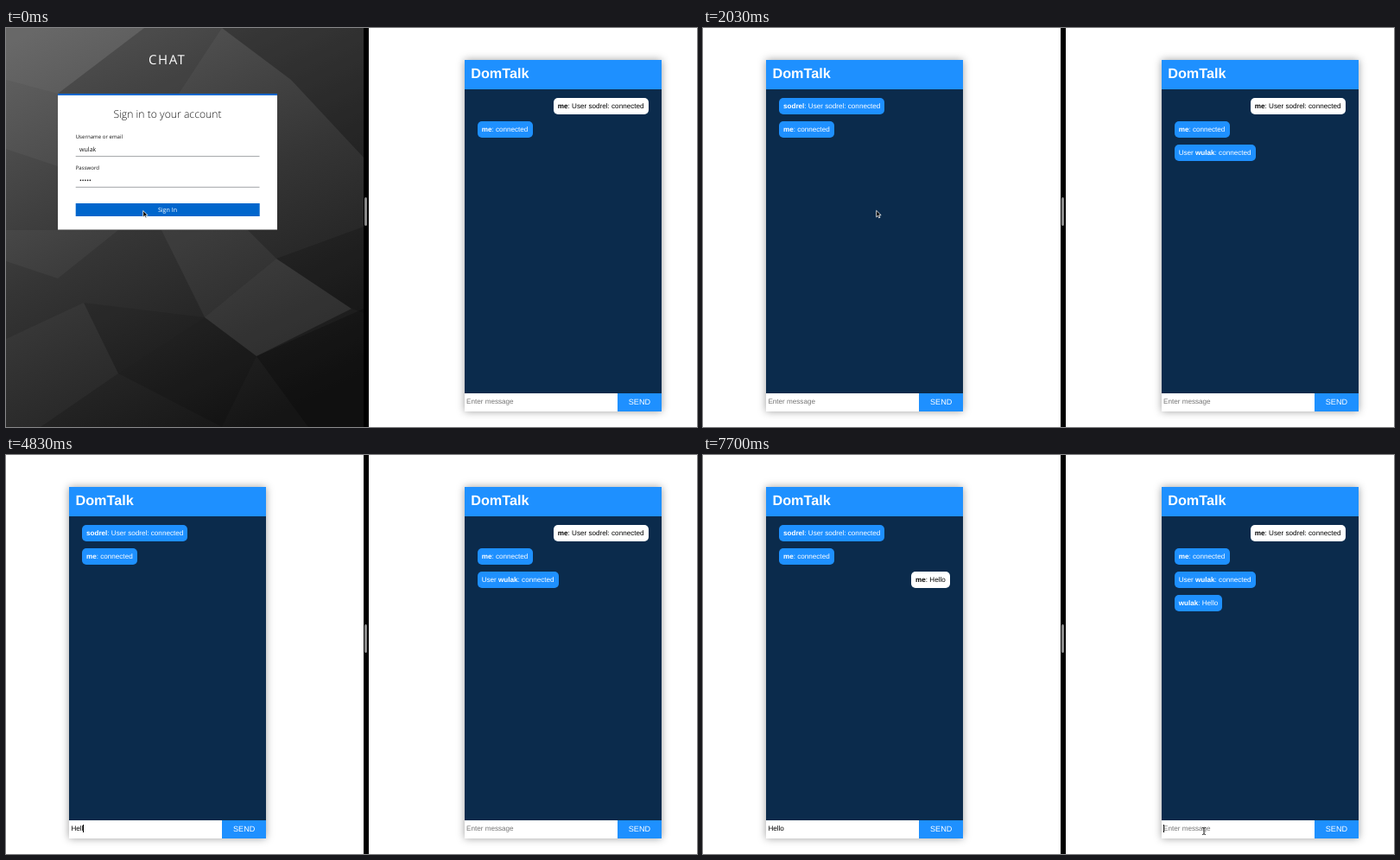
An HTML page that plays this animation: 800 by 462 pixels, repeating every 8 s.

```html
<!DOCTYPE html>
<html lang="en">
<head>
<meta charset="utf-8">
<title>Chat</title>
<style>
  html, body { margin: 0; width: 800px; height: 462px; overflow: hidden; background: #fff; }
  body { position: relative; font: 8.12px "Liberation Sans", Arial, sans-serif; text-rendering: geometricPrecision; }
  svg { position: absolute; left: 0; top: 0; overflow: visible; }
  #login { font-family: "Open Sans", sans-serif; }
  .divider { position: absolute; left: 413.5px; top: 0; width: 6px; height: 462px; background: #000; }
  .divider::after { content: ""; position: absolute; left: 1.7px; top: 196px; width: 2.6px; height: 33px; border-radius: 2px; background: #8a8a8a; }
  .panel { position: absolute; top: 37.4px; width: 228.2px; height: 406.4px; background: #0b2b4c; box-shadow: 0 0 9px rgba(0, 0, 0, .38); }
  .panel header { height: 33.5px; padding-left: 7.7px; background: #1e90ff; color: #fff; font: bold 16.24px/33.5px "Liberation Sans", Arial, sans-serif; }
  .bubble { position: absolute; left: 15px; height: 19.5px; padding: 0 5.2px; border-radius: 5px; background: #1e90ff; color: #fff; line-height: 19.5px; white-space: pre; }
  .bubble.own { left: auto; right: 15px; background: #fff; color: #000; }
  .entry { position: absolute; left: 0; bottom: 0; width: 175px; height: 20.3px; padding-left: 2.6px; background: #fff; color: #000; line-height: 20.3px; white-space: pre; }
  .caret { display: inline-block; width: .8px; height: 9px; margin-right: -.8px; vertical-align: -1.8px; background: #000; }
  .hint { color: #757575; }
  .send { position: absolute; right: 0; bottom: 0; width: 50.6px; height: 20.3px; background: #1e90ff; color: #fff; font-size: 9.1px; line-height: 20.8px; text-align: center; }
</style>
</head>
<body>
<div id="panels"></div>

<svg id="login" width="414" height="462" viewBox="0 0 414 462">
  <defs>
    <linearGradient id="shade" gradientUnits="userSpaceOnUse" x1="40" y1="0" x2="270" y2="470">
      <stop offset="0" stop-color="#5c5c5c"/>
      <stop offset=".5" stop-color="#353535"/>
      <stop offset="1" stop-color="#151515"/>
    </linearGradient>
  </defs>
  <path fill="url(#shade)" d="M0 0H414V462H0z"/>
  <g fill="#fff">
    <path opacity=".07" d="M0 0H160L60 76 0 60z"/>
    <path opacity=".04" d="M0 60L60 76V160L0 140zM0 234H130L60 290 0 270z"/>
    <path opacity=".05" d="M313 267L230 335 180 234H280z"/>
    <path opacity=".08" d="M313 267L400 325 290 380 230 335z"/>
    <path opacity=".03" d="M0 360L90 318 130 400 40 462H0z"/>
  </g>
  <g>
    <path opacity=".1" d="M160 0H250L200 76H60zM90 318L230 335 130 400z"/>
    <path opacity=".28" d="M250 0H414V150L330 60z"/>
    <path opacity=".18" d="M313 267L414 230V330L400 325z"/>
    <path opacity=".15" d="M130 400L230 335 290 380 250 462z"/>
    <path opacity=".25" d="M290 380L414 325V462H350z"/>
  </g>
  <text x="165" y="42" font-size="15" letter-spacing="1.55" fill="#fff">CHAT</text>
  <path fill="#fff" d="M60 76H314V233.5H60z"/>
  <path fill="#06c" d="M60 76H314V78H60z"/>
  <g fill="#151515">
    <text x="187" y="104" font-size="12.2" font-weight="300" text-anchor="middle">Sign in to your account</text>
    <text x="80.7" y="128" font-size="6.1">Username or email</text>
    <text x="85" y="142.6" font-size="7.1">wulak</text>
    <text x="80.7" y="163.8" font-size="6.1">Password</text>
    <text x="85" y="178.6" font-size="7.3">•••••</text>
  </g>
  <path stroke="#8a8d90" stroke-width=".8" d="M80.7 148.6H293.5M80.7 184.3H293.5"/>
  <path id="button" d="M80.7 203H293.7V218H80.7z"/>
  <text id="buttonText" x="187" y="213" font-size="7.1" text-anchor="middle">Sign In</text>
</svg>

<div class="divider"></div>

<svg id="cursor" width="1" height="1">
  <path id="arrow" fill="#000" stroke="#fff" stroke-width=".8" d="M0 0V7.6L1.8 5.9 3 8.6 4.3 8 3.1 5.4H5.5z"/>
  <path id="beam" fill="none" stroke="#222" stroke-width=".9" d="M-2-4Q0-4 0-3 0-4 2-4M0-3.5V3.5M-2 4Q0 4 0 3 0 4 2 4"/>
</svg>

<script>
const LOOP = 8000, STEP = 70;
const JOINED = 2030, TYPING = 4200, KEY_GAP = 210, SENT = 5250, SWITCHED = 7490;
const $ = id => document.getElementById(id);

// Each message: [time it appears, html, own message?]
const chats = {
  left: [
    [JOINED, "<b>sodrel</b>: User sodrel: connected"],
    [JOINED, "<b>me</b>: connected"],
    [SENT, "<b>me</b>: Hello", true],
  ],
  right: [
    [0, "<b>me</b>: User sodrel: connected", true],
    [0, "<b>me</b>: connected"],
    [JOINED, "User <b>wulak</b>: connected"],
    [SENT, "<b>wulak</b>: Hello"],
  ],
};

const panel = (side, x) => `
  <div class="panel" style="left:${x}px">
    <header>DomTalk</header>
    ${chats[side].map(([from, html, own], i) =>
      `<div class="bubble ${own ? "own" : ""}" data-from="${from}" style="top:${43.6 + 27 * i}px">${html}</div>`).join("")}
    <div class="entry"><span id="${side}Text"></span><span class="caret" id="${side}Caret"></span><span class="hint" id="${side}Hint">Enter message</span></div>
    <div class="send">SEND</div>
  </div>`;
$("panels").innerHTML = panel("left", 72.8) + panel("right", 530.5);
const bubbles = document.querySelectorAll(".bubble");

// Pointer stops: time, x, y
const stops = [
  [70, 158.7, 211.5], [420, 184, 212], [770, 184, 212], [1260, 200.7, 211.3],
  [2730, 200.7, 211.3], [3300, 199.3, 433.3], [6300, 199.3, 433.3], [7070, 580, 435.5],
];
const leftBlink = [[3360, 3850], [TYPING, 5530], [6090, 6580], [7070, SWITCHED]];

const show = (el, on) => { el.style.visibility = on ? "visible" : "hidden"; };

function pointerAt(t) {
  const i = stops.findIndex(s => s[0] > t);
  if (i < 0) return stops.at(-1).slice(1);
  if (i === 0) return stops[0].slice(1);
  const [t0, x0, y0] = stops[i - 1], [t1, x1, y1] = stops[i];
  const p = (t - t0) / (t1 - t0), e = p * p * (3 - 2 * p);
  return [x0 + (x1 - x0) * e, y0 + (y1 - y0) * e];
}

function render(t) {
  show($("login"), t < JOINED);
  $("button").setAttribute("fill", t < 140 ? "#06c" : "#004080");
  $("buttonText").setAttribute("fill", t < 1890 ? "#fff" : "#5f6b78");
  bubbles.forEach(b => show(b, t >= b.dataset.from));

  const typed = Math.max(0, Math.floor((t - TYPING) / KEY_GAP) + 1);
  $("leftText").textContent = "Hello".slice(0, typed);
  show($("leftHint"), !typed);
  show($("leftCaret"), leftBlink.some(([on, off]) => t >= on && t < off));
  show($("rightCaret"), t >= SWITCHED);

  const [x, y] = pointerAt(t);
  const visible = t < TYPING || t >= 6300;
  const overEntry = y > 423 && (x < 250 || (x > 530 && x < 708));
  $("cursor").style.transform = `translate(${x}px, ${y}px)`;
  show($("arrow"), visible && !overEntry);
  show($("beam"), visible && overEntry);
}

const start = performance.now();
function tick() {
  const t = (performance.now() - start) % LOOP;
  render(Math.floor(t / STEP) * STEP);
  requestAnimationFrame(tick);
}
tick();
</script>
</body>
</html>
```
